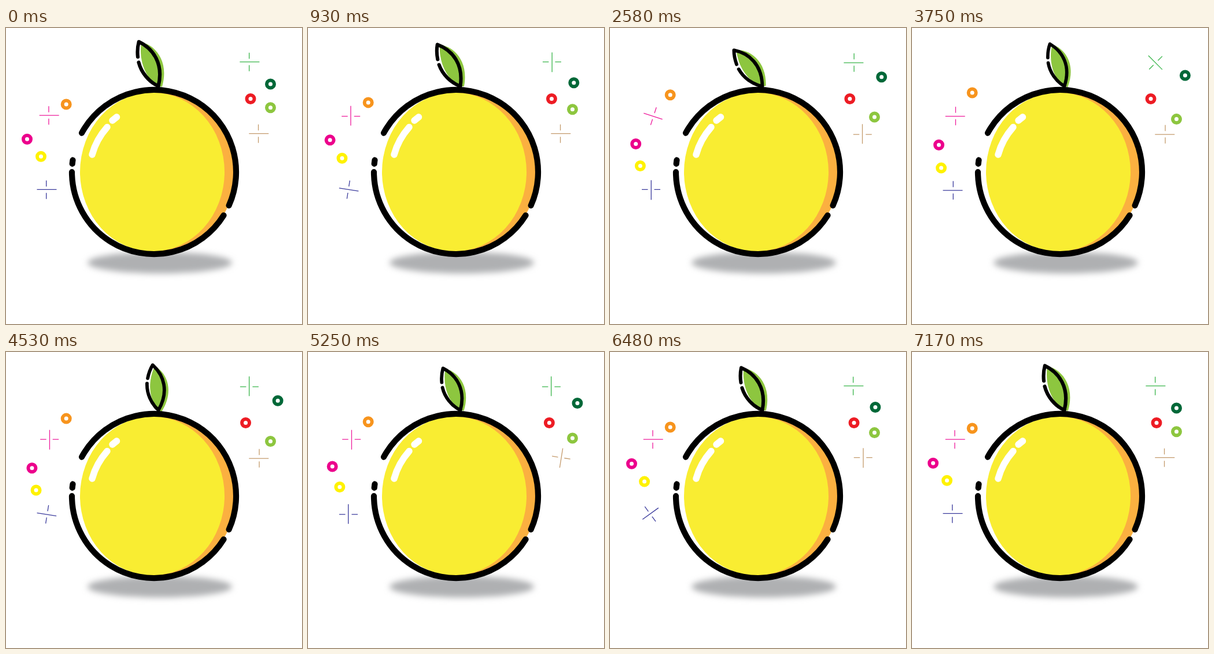
An HTML page that plays this animation: 512x512 px, repeating every 7.2 s.

```html
<!DOCTYPE html>
<html lang="en">
<head>
<meta charset="utf-8">
<title>Citrus</title>
<style>
  html, body { margin: 0; width: 100%; height: 100%; overflow: hidden; background: #fff; }
  svg { display: block; width: 100%; height: 100%; }
</style>
</head>
<body>
<svg viewBox="0 0 512 512" fill="none" stroke-linecap="round" stroke-linejoin="round">
  <defs>
    <filter id="soft" x="-20%" y="-80%" width="140%" height="260%">
      <feGaussianBlur stdDeviation="5.5"/>
    </filter>
  </defs>

  <ellipse cx="266" cy="406" rx="125" ry="18.5" fill="#afb0b2" filter="url(#soft)"/>

  <ellipse cx="268.5" cy="249" rx="128" ry="138" fill="#fbb040"/>
  <ellipse cx="253" cy="249" rx="125" ry="137.5" fill="#f9ed32"/>
  <g stroke="#fff" stroke-width="11.500">
    <path d="M149 219Q156 193 175 171.500"/>
    <path d="M184 160L191.500 154"/>
  </g>

  <g id="leaf">
    <path fill="#8dc63f" d="M234 25C256 28 283 56 270 101.500L264 101C244 90 229 60 234 25Z"/>
    <g stroke="#000" stroke-width="6.200">
      <path d="M228 50Q226.500 36 229.800 23.800C255 36 273 62 263.500 100.500"/>
      <path d="M229.500 59.500C234 77 247 93 263.500 100.500"/>
    </g>
  </g>

  <!-- Dash lengths are degrees around the rim. -->
  <circle cx="256" cy="249" r="142" stroke="#000" stroke-width="10.200" pathLength="360"
    stroke-dasharray="148.1 5.700 2.600 20 175.800 7.800" transform="rotate(31.900 256 249)"/>

  <g id="bits"></g>
</svg>
<script>
const LOOP = 7200, STEP = 30;
const QUARTER = LOOP / 4, TURN = 300;

// x, y, drift x, drift y, colour
const rings = [
  [457.5, 97, 15, -15, '#006838'],
  [423, 122.5, -10, 0, '#ed1c24'],
  [457.5, 137.7, 0, 20, '#8dc63f'],
  [104.2, 132, 0, -20, '#f7941d'],
  [36.5, 192.3, 10, 10, '#ec008c'],
  [60.5, 222.2, -10, 20, '#fff200']
];

// x, y, turn direction, start of first turn, colour
const crosses = [
  [421.4, 59.3, 1, 0, '#39b54a'],
  [74.7, 151.8, -1, 540, '#ee1c9c'],
  [70.5, 280.2, 1, 900, '#3a3a9c'],
  [437.3, 183.3, -1, 1380, '#c49a6c']
];

// time, tilt in degrees, scale
const sway = [
  [0, 0, 1], [750, 3.5, .985], [1500, 11.5, .967], [2170, 16, .952],
  [2580, 14.5, .945], [3000, 9.7, .935], [3750, -4.8, .92],
  [4500, -16.5, .938], [5250, -1.2, .935], [5820, 6.3, .95], [6750, 1, .987]
];

const bits = document.getElementById('bits');
const leaf = document.getElementById('leaf');

function add(tag, attrs) {
  const el = document.createElementNS('http://www.w3.org/2000/svg', tag);
  for (const key in attrs) el.setAttribute(key, attrs[key]);
  return bits.appendChild(el);
}

const crossEls = crosses.map(c => add('path', {
  d: 'M-17 -.75H17M-.75 -16.500V-6M-.75 5V15.500',
  stroke: c[4], 'stroke-width': 1.3, 'stroke-linecap': 'butt'
}));
const ringEls = rings.map(r => add('circle', { r: 6.5, stroke: r[4], 'stroke-width': 6 }));

function key(i) {
  const n = sway.length, k = sway[(i + n) % n];
  return [k[0] + Math.floor(i / n) * LOOP, k[1], k[2]];
}

// Smooth periodic curve through one column of the sway table.
function curve(t, col) {
  let i = sway.length - 1;
  while (sway[i][0] > t) i--;
  const [a, b, c, d] = [-1, 0, 1, 2].map(o => key(i + o));
  const span = c[0] - b[0], p = (t - b[0]) / span;
  const m = (c[col] - a[col]) / (c[0] - a[0]) * span;
  const n = (d[col] - b[col]) / (d[0] - b[0]) * span;
  const p2 = p * p, p3 = p2 * p;
  return (2 * p3 - 3 * p2 + 1) * b[col] + (p3 - 2 * p2 + p) * m
    + (3 * p2 - 2 * p3) * c[col] + (p3 - p2) * n;
}

function draw(t) {
  const drift = (1 - Math.cos(2 * Math.PI * t / LOOP)) / 2;
  rings.forEach(([x, y, dx, dy], i) => {
    ringEls[i].setAttribute('cx', x + dx * drift);
    ringEls[i].setAttribute('cy', y + dy * drift);
  });
  crosses.forEach(([x, y, dir, start], i) => {
    const u = (t - start + LOOP) % LOOP;
    const turns = Math.floor(u / QUARTER) + Math.min(u % QUARTER / TURN, 1);
    crossEls[i].setAttribute('transform', `translate(${x} ${y}) rotate(${dir * 90 * turns})`);
  });
  leaf.setAttribute('transform',
    `translate(264 101) rotate(${-curve(t, 1)}) scale(${curve(t, 2)}) translate(-264 -101)`);
}

const begin = performance.now();
function tick() {
  const t = (performance.now() - begin) % LOOP;
  draw(Math.floor(t / STEP) * STEP);
  requestAnimationFrame(tick);
}
tick();
</script>
</body>
</html>
```
